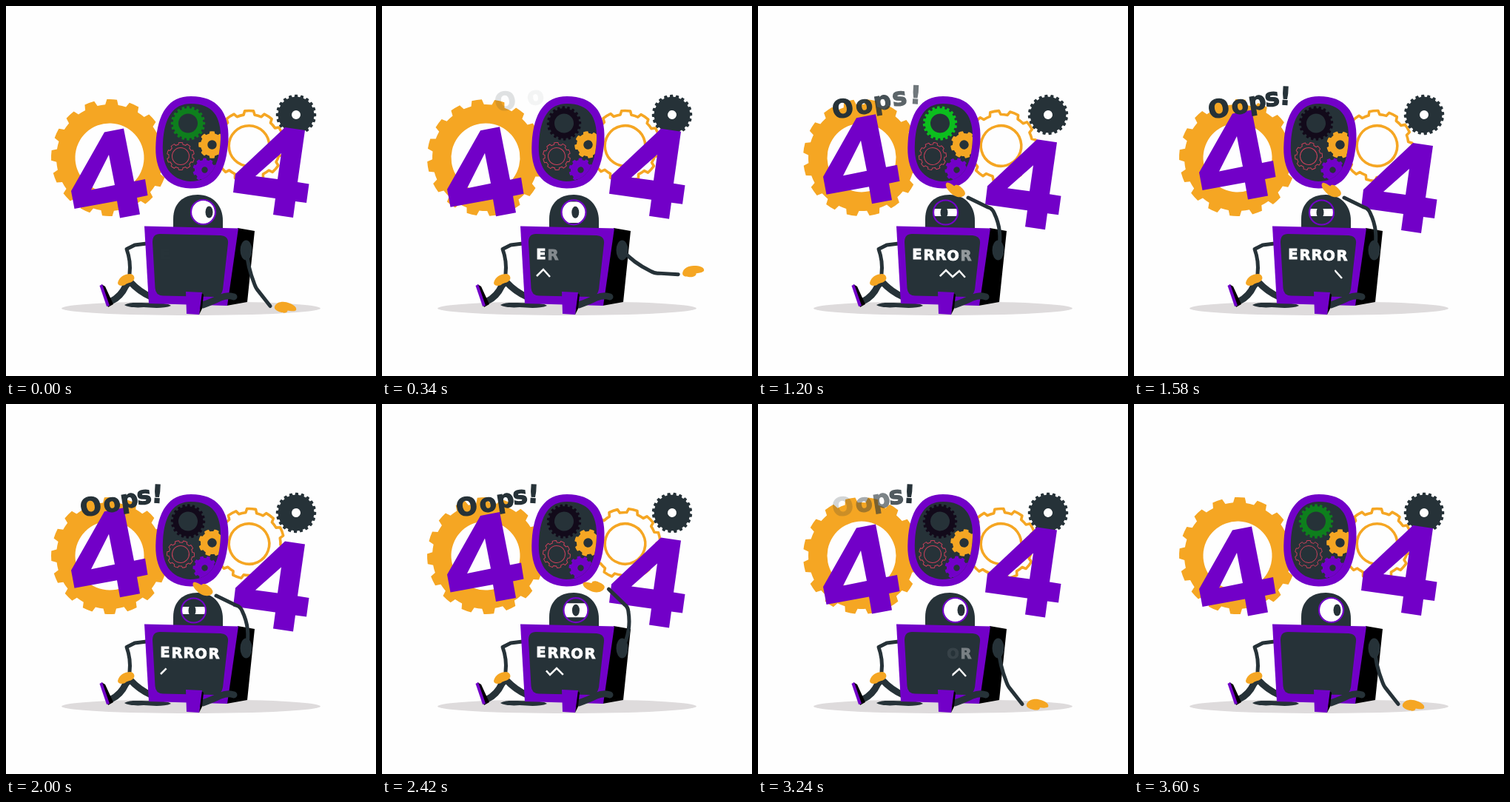
Animation, 500 px wide and 500 px high, one loop 3640 ms. Source, as an HTML page:

```html
<!DOCTYPE html>
<html lang="en">
<head>
<meta charset="utf-8">
<title>404</title>
<style>
  html, body { margin: 0; width: 100%; height: 100%; overflow: hidden; background: #fefefe; }
  svg { display: block; width: 100vw; height: 100vh; }
  text { font-family: "DejaVu Sans", sans-serif; font-weight: 900; text-anchor: middle; }
  .dark { fill: #263238; }
  .purple { fill: #7200c8; }
  .orange { fill: #f5a623; }
  .limb { fill: none; stroke: #263238; stroke-width: 5; stroke-linecap: round; stroke-linejoin: round; }
  .leg { stroke-width: 9; }
  .outline { fill: none; stroke: #f5a623; stroke-width: 3.6; stroke-linejoin: round; }
  .thin { fill: none; stroke: #c8405a; stroke-width: 1; }
</style>
</head>
<body>
<svg viewBox="0 0 500 500">
  <defs>
    <clipPath id="opening"><path id="inner" d="M250 132C279 132 291 149 290 180C288 217 277 237 249 237C222 235 210 216 212 185C214 150 226 132 250 132Z"/></clipPath>
    <clipPath id="lids"><rect id="gap" x="-20" width="40"/></clipPath>
  </defs>

  <ellipse cx="250" cy="408.5" rx="175" ry="9.5" fill="#dedbdc"/>
  <g id="backGears"></g>

  <path class="purple" d="M250 122C285 122 302 143 300.500 180C298 224 284 247 249 246.500C215 245 200 222 202.500 185C205 144 220 122 250 122Z"/>
  <use href="#inner" class="dark"/>
  <g id="innerGears" clip-path="url(#opening)"></g>

  <path id="leftFour" class="purple" fill-rule="evenodd" d="M133 170.500L159 165.500L173 237L188 234L191.500 256L177 259L181 281.500L154 286.500L150 263.500L92.500 274L88 250ZM139 201L115 248.500L147 242Z"/>
  <path id="rightFour" class="purple" fill-rule="evenodd" d="M377 164L404 168L394 238L409.500 240.500L406 266L391 264L388 286L361 282L364 260L307 252L310 227ZM372 199L337 230L367 234Z"/>
  <g id="oops" class="dark" stroke="#263238" stroke-width="1.300" font-size="33.500"></g>

  <path class="dark" d="M160 404C168 399 184 402 196 401C208 401 220 402 223 405C214 409 198 408 186 407C176 408 164 407 160 404Z"/>
  <path class="limb" d="M190 321L174 323L163 328.500Q169 345 167 362"/>
  <path class="limb leg" d="M142 399Q155 393 162 378L167 372Q181 387 196 393"/>
  <path class="orange" d="M151 374C153 366 160 362 168 362C174 363 175 369 171 372C167 375 163 374 161 377C156 379 151 378 151 374Z"/>
  <path d="M129 376L134 379L145 403L138 407Z"/>
  <path class="purple" d="M126.500 378L130 376L140 405L136 406Z"/>

  <path class="dark" d="M226 301V288C226 266 240 255 259 255C280 255 293 270 293 290V301Z"/>
  <g id="eye">
    <g clip-path="url(#lids)">
      <circle r="16" fill="#fff"/>
      <ellipse id="pupil" class="dark" rx="5" ry="8"/>
    </g>
    <circle r="16.500" fill="none" stroke="#7200c8" stroke-width="2.200"/>
  </g>

  <path d="M313 300L336 304L326 400L298 405Z"/>
  <path class="purple" d="M187 297.500L314 300.500L299 405L193 402Z"/>
  <path class="dark" d="M208 308L290 310Q301 311 300 321L293 383Q291 394 281 393L212 391.500Q202 391 201.500 381L198 319Q198 308 208 308Z"/>
  <g id="error" fill="#fff" stroke="#fff" stroke-width=".9" font-size="19.500"></g>
  <path id="zigzag" fill="none" stroke="#fff" stroke-width="2.500" pathLength="72"
    d="M209 365L218 356L227 366L236 357L245 366L254 357L263 366L272 358L281 368"/>

  <path class="limb leg" d="M266 404Q280 399 290 394Q300 390 308 393"/>
  <path d="M263 387L267 390L265 409L261 417Z"/>
  <path class="purple" d="M243 386L265 387L261 417L244 416Z"/>

  <ellipse class="dark" cx="324.500" cy="330" rx="8" ry="13.500"/>
  <g id="arm">
    <path id="armLine" class="limb"/>
    <path id="hand" class="orange" d="M6 0C8 -7 18 -9 26 -6C33 -4 37 0 35 3C31 5 27 4 24 4C24 8 18 8 15 7C10 6 5 4 6 0Z"/>
  </g>
</svg>
<script>
const LOOP = 3640, MOTION = 3600;
const $ = id => document.getElementById(id);
const clamp = v => Math.min(1, Math.max(0, v));
const smooth = p => p * p * (3 - 2 * p);
const cubic = p => p < .5 ? 4 * p ** 3 : 1 - 4 * (1 - p) ** 3;

// Eased value at time t through [time, value] stops
function track(t, stops, ease = smooth) {
  let value = stops[0][1];
  for (let i = 1; i < stops.length; i++) {
    const [t0, v0] = stops[i - 1], [t1, v1] = stops[i];
    if (t >= t0) value = v0 + (v1 - v0) * ease(clamp((t - t0) / (t1 - t0)));
  }
  return value;
}

function add(parent, tag, attrs, content = "") {
  const el = document.createElementNS("http://www.w3.org/2000/svg", tag);
  for (const name in attrs) el.setAttribute(name, attrs[name]);
  el.textContent = content;
  parent.append(el);
  return el;
}

function gearPath(teeth, outer, root, hole) {
  const pitch = 2 * Math.PI / teeth;
  const at = (r, k) => {
    const a = k * pitch - Math.PI / 2;
    return `${(r * Math.cos(a)).toFixed(2)} ${(r * Math.sin(a)).toFixed(2)}`;
  };
  let d = "";
  for (let i = 0; i < teeth; i++) {
    d += `${i ? `A${root} ${root} 0 0 1 ` : "M"}${at(root, i - .31)}L${at(outer, i - .22)}`
       + `A${outer} ${outer} 0 0 1 ${at(outer, i + .22)}L${at(root, i + .31)}`;
  }
  d += `A${root} ${root} 0 0 1 ${at(root, -.31)}Z`;
  return d + `M${hole} 0A${hole} ${hole} 0 1 0 ${-hole} 0A${hole} ${hole} 0 1 0 ${hole} 0Z`;
}

const gears = [];
function gear(parent, cls, x, y, teeth, outer, root, hole, phase = 0) {
  const el = add($(parent), "path", { class: cls, "fill-rule": "evenodd", d: gearPath(teeth, outer, root, hole) });
  gears.push({ el, x, y, phase });
  return el;
}
gear("backGears", "orange", 140, 205, 16, 79, 72, 46.5, 2.2);
gear("backGears", "outline", 328.5, 189, 11, 47.5, 42.5, 27.3);
gear("backGears", "dark", 392, 147, 20, 27.2, 24.3, 6);
const lamp = gear("innerGears", "", 246, 158.5, 20, 23.2, 20.3, 13);
gear("innerGears", "orange", 278.5, 187.5, 8, 18.3, 15.5, 6.2);
gear("innerGears", "thin", 236, 203, 10, 18.5, 16, 11.5);
gear("innerGears", "purple", 268.5, 221.5, 10, 16, 13.5, 4.2);

// Letters: character, x, baseline y, tilt
const oops = [["O", 117, 150, -12], ["o", 145, 145, -11], ["p", 168, 140, -9], ["s", 188, 135, -7], ["!", 204, 133.5, 3]]
  .map(([char, x, y, tilt]) => ({ x, y, tilt, el: add($("oops"), "text", {}, char) }));
const error = [["E", 215], ["R", 231], ["R", 247], ["O", 263.5], ["R", 281]]
  .map(([char, x], i) => add($("error"), "text", { x, y: 342 + i * .6 }, char));

function draw(t) {
  const turn = Math.min(t, MOTION) / MOTION;
  for (const g of gears)
    g.el.setAttribute("transform", `translate(${g.x} ${g.y}) rotate(${g.phase + 360 * turn})`);

  const glow = track(t, [[0, .65], [250, 0], [950, 0], [1180, 1], [1240, 1], [1450, 0], [3300, 0], [3600, .65]]);
  const mix = (a, b) => Math.round(a + (b - a) * glow);
  lamp.setAttribute("fill", `rgb(${mix(18, 12)},${mix(10, 190)},${mix(26, 30)})`);

  const bob = (1 - Math.cos(2 * Math.PI * t / LOOP)) / 2;
  $("leftFour").setAttribute("transform", `translate(0 ${-26 * bob})`);
  $("rightFour").setAttribute("transform", `translate(0 ${22 * bob})`);

  oops.forEach(({ el, x, y, tilt }, i) => {
    const p = clamp((t - 209 - 92 * i) / 954);
    const slide = 70 * (1 - p) ** 2;
    el.setAttribute("transform", `translate(${x + slide} ${y - slide * .19}) rotate(${tilt})`);
    el.setAttribute("opacity", p * (1 - clamp((t - 3000 - 60 * i) / 300)));
  });

  error.forEach((el, i) => {
    const start = Math.max(0, 280 * i - 60);
    el.setAttribute("opacity", clamp((t - start) / 280) * (1 - clamp((t - 2695 - 90 * i) / 300)));
  });

  const [tail, head] = t < 1810 ? [(t - 640) / 1090, (t - 40) / 1180] : [(t - 2160) / 1440, (t - 1890) / 1060];
  const from = 72 * clamp(tail), length = 72 * clamp(head) - from;
  $("zigzag").setAttribute("stroke-dasharray", `0 ${from} ${length} 100`);
  $("zigzag").setAttribute("visibility", length > .1 ? "visible" : "hidden");

  const look = track(t, [[0, 0], [620, 1], [2000, 1], [2700, 0]]);
  const open = track(t, [[0, 17], [1100, 5], [2080, 5], [2900, 17]]);
  $("eye").setAttribute("transform", `translate(${266.5 - 13 * look} ${278.5 + .5 * look})`);
  $("pupil").setAttribute("cx", track(t, [[0, 8], [620, -2], [2250, -2], [2850, 8]]));
  $("gap").setAttribute("y", -open);
  $("gap").setAttribute("height", 2 * open);

  const swing = track(t, [[0, 67], [880, -120], [2130, -120], [3160, 67]], cubic);
  const bend = 8 + 12 * (67 - swing) / 187;
  const wrist = track(t, [[0, -62], [640, -15], [1200, -29], [1900, -30], [2420, -67], [2920, -68], [3600, -62]]);
  $("arm").setAttribute("transform", `translate(325 330) rotate(${swing})`);
  $("armLine").setAttribute("d", `M0 0Q20 ${bend * .9} 46 ${bend}Q53 ${bend * 1.05} 57 ${bend * .85}L82 0`);
  $("hand").setAttribute("transform", `translate(82 0) rotate(${wrist})`);
}

const began = performance.now();
function tick() {
  draw((performance.now() - began) % LOOP);
  requestAnimationFrame(tick);
}
tick();
</script>
</body>
</html>
```
